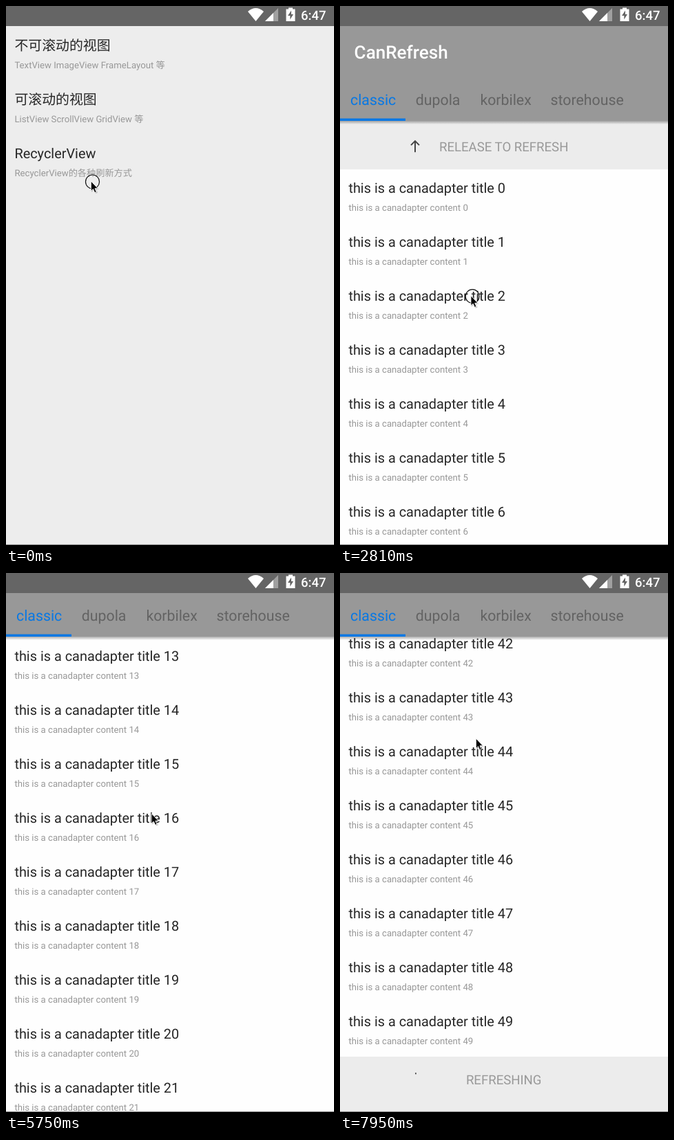
An HTML page for the animation above (8000 ms loop, 476 by 779 pixels).

```html
<!DOCTYPE html>
<html lang="zh-CN">
<head>
<meta charset="utf-8">
<title>CanRefresh</title>
<style>
  html, body { margin: 0; width: 100%; height: 100%; overflow: hidden; background: #ededed; }
  svg { display: block; width: 476px; height: 779px; }
  text { font-family: Roboto, "Noto Sans CJK SC", "Noto Sans CJK", sans-serif; text-rendering: geometricPrecision; white-space: pre; }
  .title { font-size: 19.9px; fill: #262626; }
  .sub { font-size: 13.2px; fill: #989898; }
  .tab { font-size: 21.3px; fill: #636363; }
  .tab.on { fill: #0878e4; }
  .bar { font-weight: 500; fill: #fff; }
  .hint { font-size: 18.6px; fill: #999; text-anchor: middle; }
  .line { fill: none; stroke: #444; stroke-width: 2; }
</style>
</head>
<body>
<svg viewBox="0 0 476 779">
  <defs>
    <linearGradient id="shade" x2="0" y2="1">
      <stop stop-color="#000" stop-opacity=".32"/>
      <stop offset="1" stop-color="#000" stop-opacity="0"/>
    </linearGradient>
  </defs>
  <rect width="476" height="779" fill="#ededed"/>
  <g id="home" transform="translate(0 30)"></g>

  <g id="page">
    <rect y="29" width="476" height="750" fill="#ececec"/>
    <g id="list">
      <rect width="476" height="3900" fill="#fefefe"/>
      <g id="rows"></g>
      <g id="header" transform="translate(0 -33)"></g>
      <g id="footer" transform="translate(0 3933)"></g>
    </g>
    <path id="glow" d="M0 779V739A1025 1025 0 0 1 476 739V779Z" fill="#969696"/>
    <g id="appbar">
      <rect y="166" width="476" height="5" fill="url(#shade)"/>
      <rect y="29" width="476" height="137" fill="#989898"/>
      <text class="bar" x="20.6" y="76" font-size="26.1">CanRefresh</text>
      <text class="tab on" x="15" y="143">classic</text>
      <text class="tab" x="109.8" y="143">dupola</text>
      <text class="tab" x="203.4" y="143">korbilex</text>
      <text class="tab" x="305.6" y="143">storehouse</text>
      <rect y="162.5" width="95" height="3.5" fill="#0878e4"/>
    </g>
  </g>

  <g id="status">
    <rect width="476" height="29" fill="#656565"/>
    <g fill="#fff">
      <path d="M351 8Q362.5-2 374 8L362.5 22Z"/>
      <path d="M395 3V22H376Z" fill="#a0a0a0"/>
      <path d="M388 10V22H376Z"/>
      <path d="M406.5 4.5H410V2.5H416V4.5H419.5V22H406.5Z"/>
      <path d="M414 6.5L409 14H412.3V19.5L417 12H414Z" fill="#656565"/>
      <text class="bar" x="428" y="20" font-size="18.5">6:47</text>
    </g>
  </g>
  <rect y="778" width="476" height="1" fill="#929292"/>

  <g id="cursor">
    <circle id="press" cx="2.5" cy="1" r="10" fill="none" stroke="#111" stroke-width="1.2"/>
    <path d="M1 2V16L4.5 13L7 18L10 17L8 12H12Z" opacity=".2"/>
    <path d="M.3 0V14.5L3.5 11.6L5.8 16.8L8.2 15.7L6 10.7H10.3Z" stroke="#fff" stroke-width=".9"/>
  </g>
</svg>
<script>
const LOOP = 8000, STEP = 147.2, ROW = 78, BAR = 66;
const $ = id => document.getElementById(id);

const row = (i, title, sub) =>
  `<text class="title" x="12.4" y="${i * ROW + 34}">${title}</text>` +
  `<text class="sub" x="12.4" y="${i * ROW + 60}">${sub}</text>`;

$('home').innerHTML = [
  ['不可滚动的视图', 'TextView ImageView FrameLayout 等'],
  ['可滚动的视图', 'ListView ScrollView GridView 等'],
  ['RecyclerView', 'RecyclerView的各种刷新方式']
].map((texts, i) => row(i, ...texts)).join('');

$('rows').innerHTML = Array.from({ length: 50 }, (_, i) =>
  row(i, `this is a canadapter title ${i}`, `this is a canadapter content ${i}`)).join('');

for (const id of ['header', 'footer'])
  $(id).innerHTML = '<text class="hint" x="237.7" y="6.6"></text><path class="line"/>';

// Resting points of the pointer: step, x, y.
const stops = [
  [0, 123, 253], [4, 112, 225.5], [9, 112, 225.5], [14, 171, 214], [23, 203, 565], [28, 203, 565],
  [33, 225, 686], [38, 209, 286], [42, 221, 680], [45, 211, 320], [49, 222, 645], [54, 197, 239]
];
// First and last step of each touch.
const touches = [[0, 0], [6, 6], [15, 21], [34, 36], [42, 44], [49, 51]];

const mix = (a, b, t) => a + (b - a) * t;
const progress = (k, from, to) => Math.min(1, Math.max(0, (k - from) / (to - from)));
const smooth = (k, from, to) => {
  const t = progress(k, from, to);
  return t * t * (3 - 2 * t);
};
const easeOut = (k, from, to) => 1 - (1 - progress(k, from, to)) ** 2;

function pointer(k) {
  const next = Math.max(1, stops.findIndex(stop => stop[0] >= k));
  const [from, x0, y0] = stops[next - 1], [to, x1, y1] = stops[next];
  const t = smooth(k, from, to);
  return [mix(x0, x1, t), mix(y0, y1, t)];
}

// Follows the finger with friction, then springs back to rest.
function overscroll(k, start, release, end, originY, rest) {
  if (k < start) return 0;
  const distance = Math.abs(pointer(Math.min(k, release))[1] - originY);
  return mix(.45 * distance, rest, easeOut(k, release, end));
}

const move = (id, x, y) => $(id).setAttribute('transform', `translate(${x} ${y})`);
const polar = deg => {
  const a = deg * Math.PI / 180;
  return `${109 + 8.7 * Math.cos(a)} ${8.7 * Math.sin(a)}`;
};

function spinner(n) {
  const start = -90 + 50 * n, sweep = 12 + 246 * Math.sin(Math.PI * n / 6) ** 2;
  return `M${polar(start)}A8.7 8.7 0 ${+(sweep > 180)} 1 ${polar(start + sweep)}`;
}

function showBar(id, k, amount, busyStep, doneStep, down) {
  const [label, mark] = $(id).children;
  const ready = amount > BAR, s = down !== ready ? 1 : -1;
  const done = k >= doneStep, busy = k >= busyStep;
  label.textContent = done ? 'COMPLETE' : busy ? 'REFRESHING'
    : ready ? 'RELEASE TO REFRESH' : 'PULL TO REFRESH';
  mark.setAttribute('d', done ? '' : busy ? spinner(k - busyStep)
    : `M109 ${-8 * s}V${8 * s}M103 ${2 * s}L109 ${8 * s}L115 ${2 * s}`);
  $(id).style.display = amount > 0 ? '' : 'none';
}

function draw(now) {
  const k = Math.floor((now % LOOP) / STEP);
  const pull = k < 16 ? 0 : overscroll(k, 16, 22, 25, 265, BAR) * (1 - smooth(k, 30, 33));
  const lift = overscroll(k, 49, 52, 54, 645, BAR + 14);
  const scroll = 13 * ROW * smooth(k, 34, 39) + 2200 * smooth(k, 41, 47);
  const collapse = k >= 35 ? 74 : 0;

  $('page').style.display = k >= 10 ? '' : 'none';
  $('page').style.opacity = k === 10 ? .5 : 1;
  move('page', 0, 36 * (1 - easeOut(k, 10, 12)));
  move('appbar', 0, -collapse);
  move('list', 0, 167 - collapse - scroll + pull - lift);
  showBar('header', k, pull, 22, 30, true);
  showBar('footer', k, lift, 54, Infinity, false);
  $('glow').style.opacity = k < 47 ? 0 : .36 * (1 - smooth(k, 47, 49));

  move('cursor', ...pointer(k));
  $('press').style.display = touches.some(([a, b]) => k >= a && k <= b) ? '' : 'none';
  requestAnimationFrame(draw);
}
requestAnimationFrame(draw);
</script>
</body>
</html>
```
